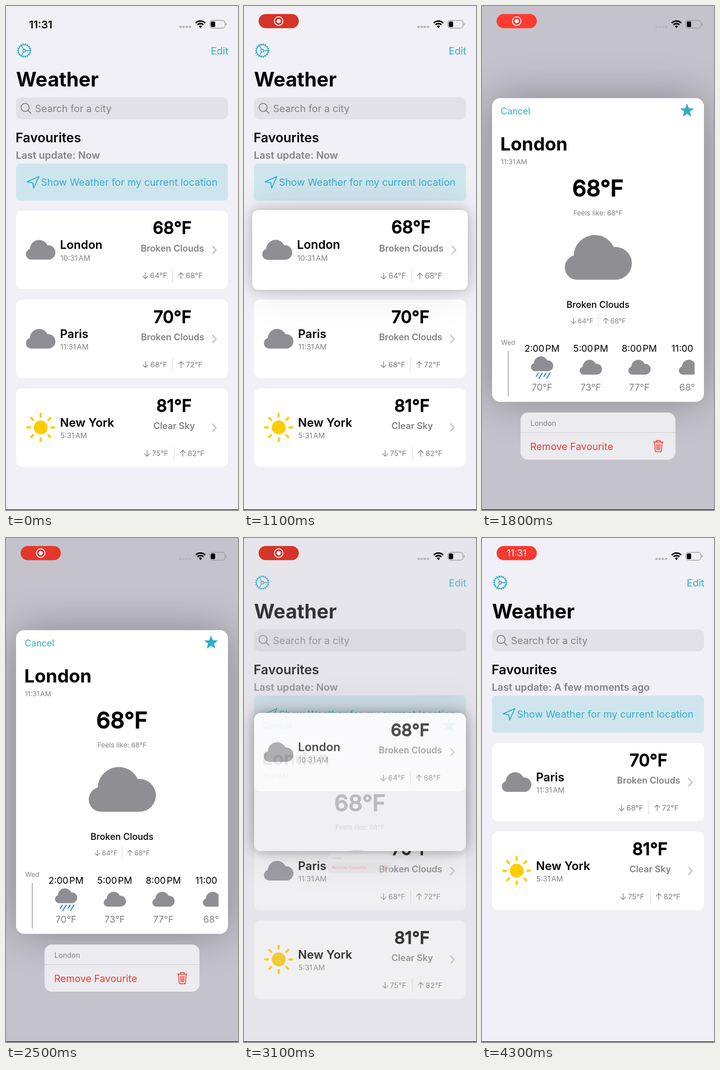
An HTML page that plays this animation: 508 px wide and 1102 px high, repeating every 4400 ms.

```html
<!DOCTYPE html>
<html lang="en">
<head>
<meta charset="utf-8">
<title>Weather favourites</title>
<style>
html, body { margin: 0; width: 100%; height: 100%; overflow: hidden; background: #f1f0f6; }
svg { display: block; width: 100vw; height: 100vh; font-family: Inter, "Liberation Sans", sans-serif; font-optical-sizing: none; }
</style>
</head>
<body>
<svg id="stage" viewBox="0 0 508 1102" xmlns="http://www.w3.org/2000/svg"></svg>
<script>
const TEAL = '#30afc7', GREY = '#828287', CLOUD = '#8e8e93', RED = '#f23a30';
const LOOP = 4400, CENTER_Y = 533.5, CARD_H = 172, PREVIEW_H = 664, PITCH = 194;

// ---- Drawing helpers ----
const text = (x, y, size, str, fill = '#000', weight = 400, anchor = 'start', extra = '') =>
  `<text x="${x}" y="${y}" font-size="${size}" fill="${fill}" font-weight="${weight}" text-anchor="${anchor}" ${extra}>${str}</text>`;
const rect = (x, y, w, h, r, fill, extra = '') =>
  `<rect x="${x}" y="${y}" width="${w}" height="${h}" rx="${r}" fill="${fill}" ${extra}/>`;
const line = (d, color, width, extra = '') =>
  `<path d="${d}" fill="none" stroke="${color}" stroke-width="${width}" stroke-linecap="round" stroke-linejoin="round" ${extra}/>`;
const circle = (x, y, r, paint) => `<circle cx="${x}" cy="${y}" r="${r}" ${paint}/>`;
const outline = (color, width) => `fill="none" stroke="${color}" stroke-width="${width}"`;
const clock = str => str.replace(' ', '<tspan dx="2">') + '</tspan>';
const polar = (x, y, r, deg) => {
  const a = deg * Math.PI / 180;
  return `${(x + r * Math.cos(a)).toFixed(2)} ${(y + r * Math.sin(a)).toFixed(2)}`;
};

const cloud = (x, y, k) =>
  `<path transform="translate(${x} ${y}) scale(${k})" fill="${CLOUD}" d="M28 98A27 27 0 0 1 21 45A46 46 0 0 1 108.5 26.5A35.85 35.85 0 1 1 112 98Z"/>`;

function sun(x, y) {
  let rays = '';
  for (let a = 0; a < 360; a += 45) rays += `M${polar(x, y, 23.5, a)}L${polar(x, y, 29.5, a)}`;
  return circle(x, y, 15.2, 'fill="#ffcc00"') + line(rays, '#ffcc00', 4.8);
}

function star(x, y, r) {
  const points = Array.from({ length: 10 }, (_, i) => polar(x, y, i % 2 ? r * 0.42 : r, i * 36 - 90));
  return `<path d="M${points.join('L')}Z" fill="${TEAL}" stroke="${TEAL}" stroke-linejoin="round"/>`;
}

function gear(x, y) {
  let teeth = '', spokes = '';
  for (let a = 0; a < 360; a += 20) teeth += `M${polar(x, y, 13, a)}L${polar(x, y, 15, a)}`;
  for (let a = 0; a < 360; a += 120) spokes += `M${polar(x, y, 3.4, a)}L${polar(x, y, 12.5, a)}`;
  return circle(x, y, 12.8, outline(TEAL, 1.9)) + circle(x, y, 3.2, outline(TEAL, 1.7)) +
    line(teeth, TEAL, 2.2) + line(spokes, TEAL, 1.8);
}

const temperature = (x, y, size, str) =>
  text(x, y, size, str, '#000', 500, 'middle', `stroke="#000" stroke-width="${size * 0.035}" stroke-linejoin="round"`);

const range = (x, y, k, low, high) => `<g transform="translate(${x} ${y}) scale(${k})">` +
  line('M-59 -6.5V6.5M-64.5 1L-59 6.5L-53.5 1M19 6.5V-6.5M13.5 -1L19 -6.5L24.5 -1', GREY, 1.5) +
  line('M.5 -15V15', '#d9d9dd', 1.2) +
  text(-48.5, 5.8, 16.4, low + '°F', GREY) + text(29.5, 5.8, 16.4, high + '°F', GREY) + '</g>';

// A favourite card drawn in the first slot
const card = c => rect(22, 448, 464, 171.5, 13, '#fff') + c.icon +
  text(118.3, 531.5, 25.6, c.city, '#000', 600) +
  text(119, 557, 16.1, clock(c.time), GREY) +
  temperature(c.x, 498.5, 37, c.temp + '°F') +
  text(c.x + 0.3, 537, 19.7, c.sky, GREY, 600, 'middle') +
  range(c.x, 590, 1, c.low, c.high) +
  line('M452.5 526L460 534L452.5 542', '#c3c3c7', 2.6);

const cardCloud = cloud(43, 512, 0.44);
const london = { city: 'London', time: '10:31 AM', temp: 68, sky: 'Broken Clouds', low: 64, high: 68, x: 364, icon: cardCloud };
const paris = { city: 'Paris', time: '11:31 AM', temp: 70, sky: 'Broken Clouds', low: 68, high: 72, x: 364.5, icon: cardCloud };
const newYork = { city: 'New York', time: '5:31 AM', temp: 81, sky: 'Clear Sky', low: 75, high: 82, x: 368, icon: sun(76, 533.5) };

const header = gear(40, 97.5) +
  text(487, 106, 21.8, 'Edit', TEAL, 400, 'end') +
  text(22, 176, 43.4, 'Weather', '#000', 700) +
  rect(22, 199.5, 464, 48.5, 13, '#e2e1e7') +
  circle(41.8, 221.8, 8.8, outline(GREY, 2)) + line('M48.3 228.5L54.5 234.5', GREY, 2.3) +
  text(63.5, 232, 21.6, 'Search for a city', GREY) +
  text(21, 298, 28.3, 'Favourites', '#000', 600) +
  text(21.5, 333.5, 21.9, '', GREY, 600, 'start', 'id="updated"') +
  rect(22, 344.5, 464, 81, 8, '#cfe5ee') +
  line('M46 384.5L72 373L60.5 398L58.5 386.5Z', TEAL, 2) +
  text(76.5, 393, 21.6, 'Show Weather for my current location', TEAL);

const hour = (x, time, temp, rain) =>
  text(x, 756, 20.2, clock(time), '#000', 400, 'middle') +
  cloud(x - 24.5, rain ? 766.5 : 774, 0.332) +
  (rain ? line([0, 8.5, 17, 25.5].map((d, i) =>
    `M${x - 8 + d} 803l${i % 2 ? '-7 11.5' : '-4.5 7.5'}`).join(''), '#1f80de', 2.4) : '') +
  text(x, 841, 20.5, temp + '°F', GREY, 400, 'middle');

const preview = rect(22, 202, 464, PREVIEW_H, 0, '#fff') +
  text(41, 237, 19.7, 'Cancel', TEAL) + star(449, 229.5, 14.8) +
  text(40, 316, 40.2, 'London', '#000', 700) +
  text(41.5, 346, 14.8, clock('11:31 AM'), GREY) +
  temperature(254, 416.5, 49, '68°F') +
  text(254, 458, 15, 'Feels like: 68°F', GREY, 400, 'middle') +
  cloud(180, 501, 1) +
  text(254, 660, 19.8, 'Broken Clouds', '#000', 500, 'middle') +
  range(254, 689, 0.915, 64, 68) +
  text(42, 741.5, 14.4, 'Wed', GREY) + line('M57.5 755.5V853.5', CLOUD, 1.5) +
  '<g clip-path="url(#hours)">' + hour(131.3, '2:00 PM', 70, true) + hour(238, '5:00 PM', 73) +
  hour(344.5, '8:00 PM', 77) + hour(455.2, '11:00 PM', 68) + '</g>';

const menu = rect(84.5, 889, 339, 103, 16, '#ecebef') +
  '<path id="pressed" fill="#d8d7da" d="M84.5 932.5H423.5V976A16 16 0 0 1 407.5 992H100.5A16 16 0 0 1 84.5 976Z"/>' +
  line('M84.5 932.5H423.5', '#c9c9cd', 1) +
  text(106, 917.5, 15.8, 'London', GREY) +
  text(105.5, 971, 21.5, 'Remove Favourite', RED) +
  line('M376 953.5H396.5M382 953V951Q382 949.8 383.2 949.8H389Q390.2 949.8 390.2 951V953M378 954L379.4 972.5Q379.6 974.7 381.8 974.7H390.6Q392.8 974.7 393 972.5L394.4 954M382.7 958L383.2 970.5M386.2 958V970.5M389.7 958L389.2 970.5', RED, 1.8);

const arc = r => `M${polar(425.8, 47.5, r, -135)}A${r} ${r} 0 0 1 ${polar(425.8, 47.5, r, -45)}`;
const status = [0, 7, 14, 21].map(d => rect(379.5 + d, 43.5, 5, 4.5, 1, '#b5b5ba')).join('') +
  `<path d="${arc(14.6)}${arc(9)}" ${outline('#000', 3.4)}/><path d="${arc(4.8)}L425.8 48.5Z"/>` +
  rect(446.5, 31.5, 33, 17, 5.5, 'none', 'stroke="#98989d" stroke-width="1.3"') +
  rect(448.5, 33.8, 9.5, 12.4, 3, '#000') + line('M482 38.5V41.5', '#98989d', 1.8) +
  text(76, 48.5, 23, '11:31', '#000', 600, 'middle', 'id="plainTime"') +
  '<g id="pill">' + rect(32, 17.5, 88, 31, 15.5, RED, 'id="pillShape"') +
  '<g id="record">' + circle(76, 33, 9.4, outline('#fff', 2)) + circle(76, 33, 4.6, 'fill="#fff"') + '</g>' +
  text(76, 40.3, 20.2, '11:31', '#fff', 400, 'middle', 'id="pillTime"') + '</g>';

const stage = document.getElementById('stage');
stage.innerHTML =
  '<defs><clipPath id="frame"><rect id="frameRect"/></clipPath><clipPath id="hours"><rect x="22" y="700" width="443.5" height="170"/></clipPath></defs>' +
  rect(0, 0, 508, 1102, 0, '#f1f0f6') +
  `<g id="list">${header}<g id="parisCard">${card(paris)}</g><g id="yorkCard">${card(newYork)}</g></g>` +
  rect(0, 0, 508, 1102, 0, '#e8e8ec', 'id="veil"') +
  rect(0, 0, 0, 0, 16, '#000', 'id="wide" style="filter:blur(48px)"') +
  rect(0, 0, 0, 0, 16, '#000', 'id="tight" style="filter:blur(12px)"') +
  `<g id="menu">${menu}</g>` +
  '<g id="lifted" clip-path="url(#frame)">' + rect(0, 0, 508, 1102, 0, '#ecedf1', 'id="backing"') +
  `<g id="preview">${preview}</g><g id="londonCard">${card(london)}</g></g>` +
  `<g>${status}</g>` + rect(0, 1100.8, 508, 1.2, 0, '#000');

// ---- Animation ----
const el = {};
stage.querySelectorAll('[id]').forEach(n => el[n.id] = n);
const set = (node, attrs) => Object.entries(attrs).forEach(([k, v]) => node.setAttribute(k, v));
const clamp = v => Math.max(0, Math.min(1, v));
const ramp = (t, a, b) => clamp((t - a) / (b - a));
const smooth = x => (1 - Math.cos(Math.PI * x)) / 2;
const cubic = x => x < 0.5 ? 4 * x ** 3 : 1 - 4 * (1 - x) ** 3;
const mix = (a, b, k) => a + (b - a) * k;
const blend = (a, b, k) => `rgb(${a.map((v, i) => Math.round(mix(v, b[i], k)))})`;

function drawStatus(t) {
  const shown = ramp(t, 300, 500), showTime = ramp(t, 3180, 3330);
  const beat = (t + 1000) % 2000;
  const glow = smooth(beat < 1000 ? ramp(beat, 100, 800) : 1 - ramp(beat, 1100, 1800));
  set(el.plainTime, { opacity: 1 - shown });
  set(el.pill, { opacity: shown });
  set(el.pillShape, { fill: blend([214, 51, 41], [255, 59, 48], glow) });
  set(el.record, { opacity: 1 - showTime });
  set(el.pillTime, { opacity: showTime });
}

function drawList(t, closing) {
  const slide = PITCH * smooth(ramp(t, 3150, 3450));
  set(el.parisCard, { transform: `translate(0 ${PITCH - slide})` });
  set(el.yorkCard, { transform: `translate(0 ${2 * PITCH - slide})` });
  el.updated.textContent = 'Last update: ' + (t < 3200 ? 'Now' : 'A few moments ago');
  const blur = closing ? 0 : 14 * ramp(t, 1330, 1560);
  el.list.style.filter = blur ? `blur(${blur}px)` : 'none';
}

function drawLifted(t, closing, open) {
  const lift = closing ? 0 : ramp(t, 800, 1400);
  const scale = 1 + 0.0345 * lift * (1 - open * open);
  const width = 464 * scale, height = mix(CARD_H * scale, PREVIEW_H, open);
  const top = CENTER_Y - height / 2;
  const box = { x: 254 - width / 2, y: top, width, height, rx: mix(13, 18, open) };
  const place = y => `translate(254 ${top}) scale(${scale}) translate(-254 ${-y})`;
  const gone = ramp(t, 3150, 3350);

  [el.frameRect, el.wide, el.tight].forEach(n => set(n, box));
  set(el.preview, { transform: place(202), opacity: clamp((open - 0.16) / 0.5) });
  set(el.londonCard, { transform: place(448), opacity: clamp(1 - open * 1.2) });
  set(el.backing, { opacity: open > 0 ? 1 : 0 });
  set(el.lifted, { opacity: 1 - gone });

  set(el.wide, { opacity: closing ? 0.52 * open : 0.22 * lift + 0.1 * open });
  set(el.tight, { opacity: closing
    ? 0.4 * clamp((1 - open) * 10) * clamp(open * 3)
    : 0.22 * clamp(lift * 2) * clamp(1 - 2 * open) });

  const size = 0.2 + 0.8 * open;
  set(el.menu, {
    transform: `translate(254 ${top + height + 23.5 * open}) scale(${size}) translate(-254 -889)`,
    opacity: clamp((open - 0.12) / 0.4)
  });
  set(el.pressed, { opacity: t > 2820 ? 1 : 0 });
}

function draw(t) {
  const closing = t >= 2908;
  const open = closing ? 1 - cubic(ramp(t, 2908, 3232)) : cubic(ramp(t, 1500, 1795));
  set(el.veil, {
    opacity: closing ? open : smooth(ramp(t, 1340, 1560)),
    fill: closing ? '#c6c6cc' : blend([232, 232, 236], [196, 195, 204], ramp(t, 1600, 1800))
  });
  drawStatus(t);
  drawList(t, closing);
  drawLifted(t, closing, open);
}

function tick() {
  draw(performance.now() % LOOP);
  requestAnimationFrame(tick);
}
tick();
</script>
</body>
</html>
```
